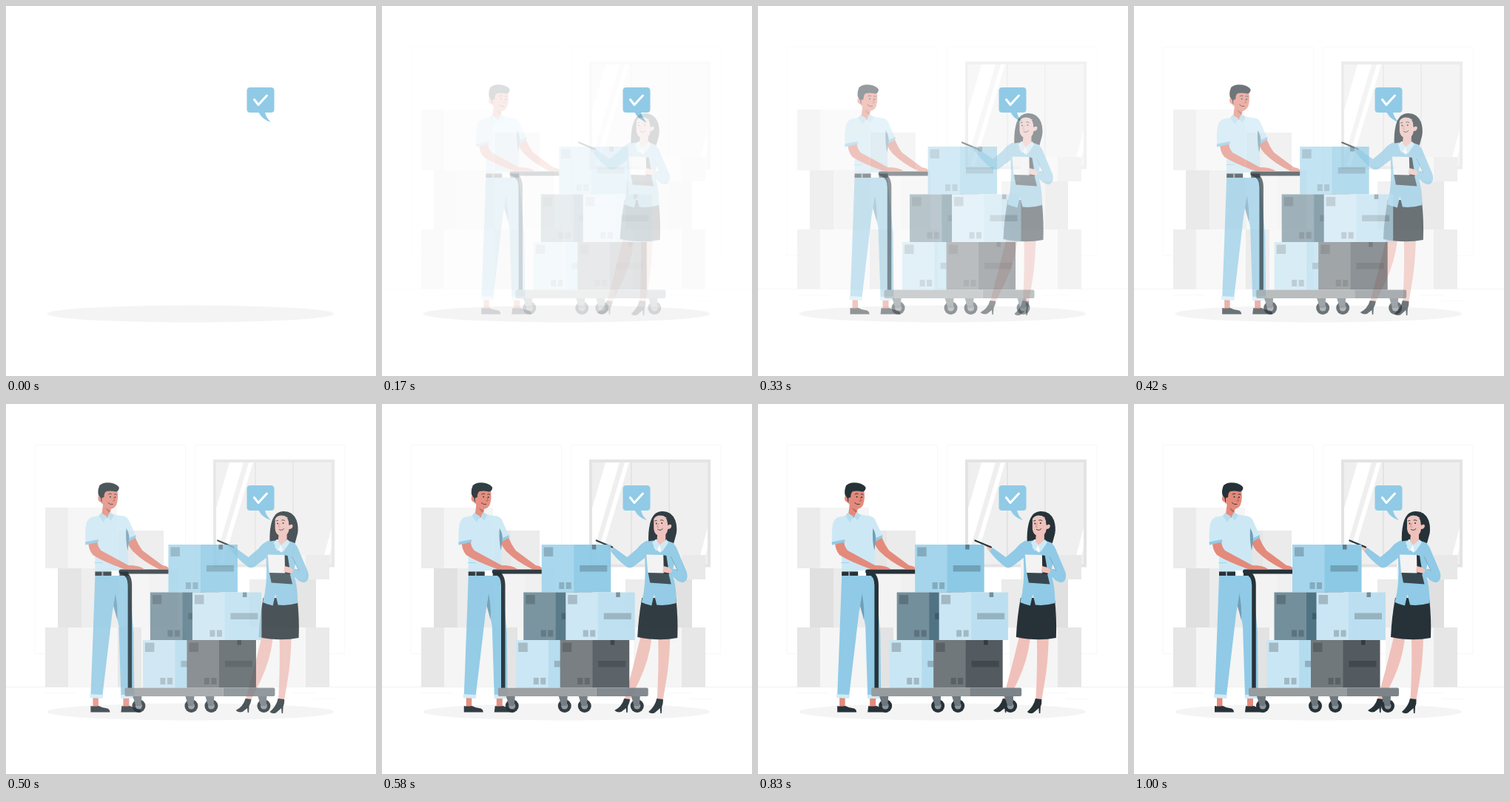
Write an HTML page that moves like this. It is 500 px wide and 500 px high and loops after 1040 ms.

```html
<!DOCTYPE html>
<html lang="en">
<head>
<meta charset="utf-8">
<title>Order check</title>
<style>
html, body { margin: 0; width: 100%; height: 100%; overflow: hidden; background: #fff; }
svg { display: block; width: 100%; height: 100%; }
.sky { fill: #90cae6; }
.pale { fill: #cde8f5; }
.ink { fill: #263238; }
.tan { fill: #e48a7b; }
.rose { fill: #efc1ba; }
.line { fill: none; stroke: #263238; stroke-linecap: round; stroke-linejoin: round; }
</style>
</head>
<body>
<svg viewBox="0 0 500 500">
  <g id="room" opacity="0">
    <g fill="none" stroke="#f7f7f7">
      <path d="M39 55.5H242.500V337.500H39ZM255.500 55.500H458V337.500H255.500Z"/>
      <path d="M0 382.500H500" stroke="#f0f0f0"/>
      <path d="M388 390.500H418M416 398.500H447M53 390.500H95"/>
    </g>
    <path fill="#e3e3e3" d="M280 75H444V220.500H280Z"/>
    <path fill="#efefef" d="M284 79H440V216.500H284Z"/>
    <path fill="#fff" d="M302 79H321L284 205V141ZM328 79H334L293 216H287ZM440 167V194L434 216H427Z"/>
    <path fill="#e3e3e3" d="M336 79H338V217H336ZM387 79H389V217H387Z"/>
    <g id="stock"></g>
  </g>
  <ellipse cx="249.500" cy="416" rx="194" ry="11.500" fill="#f4f4f4"/>
  <path class="sky" d="M330 110H358Q362.500 110 362.500 114.500V139.500Q362.500 144 358 144H350Q352 152 358 157Q347 154 341.500 144H330Q325.500 144 325.500 139.500V114.500Q325.500 110 330 110Z"/>
  <path d="M335.500 126.500L341 133.500L352.500 121" fill="none" stroke="#fff" stroke-width="3" stroke-linecap="round" stroke-linejoin="round"/>

  <g id="man" opacity="0">
    <path class="tan" d="M112 396H119.500V410H112ZM153 396H161V410H153Z"/>
    <path class="ink" d="M109 408Q114 409 120 408Q125 411 132 411.500Q135 413 135 416.500H109ZM151 408Q156 409 162 408Q167 411 174 411.500Q177 413 177 416.500H150Z"/>
    <path class="sky" d="M138 231H159Q163 260 167 310L168 394H150L147 300L139 258Z"/>
    <path fill="#6f9fb7" d="M141 250Q146 270 145 292L139 270Z"/>
    <path class="sky" d="M115 231H146Q143 255 138 284L125 394H109Q112 320 115 231Z"/>
    <path fill="#cfeaf6" d="M108 392L126 393L125 398L108 397ZM149.500 393L168.500 392V398H150Z"/>
    <path class="tan" d="M158 184L169 180Q173 190 179 198L206 218Q214 219 215 223H201Q180 213 166 199Q160 192 158 184Z"/>
    <path class="pale" d="M149 151Q157 151 160 156L170 178L158 184Z"/>
    <path class="sky" d="M157 183L170 177V180.500L159 187Z"/>
    <path class="pale" d="M112 153L126 149H139L154 152Q159 165 159 190L160 215V227H115V210Z"/>
    <path fill="#719fb6" d="M157 168Q160 172 161 179Q161 186 159 198Q156 184 157 168Z"/>
    <path class="ink" d="M115 226.500H160V232H115Z"/>
    <path fill="#fff" d="M137 225H148V232H137Z"/>
    <path fill="#90a4ae" d="M124 226H126V232H124Z"/>
    <path class="tan" d="M106 187L118 185Q118 192 123 198L160 218Q175 218 181 223H154Q126 213 112 204Q106 197 106 187Z"/>
    <path class="pale" d="M114 152Q105 153 103 162Q101 173 102 187L119 184.500Q121 166 114 152Z"/>
    <path class="sky" d="M101.500 186.500L119 183L119.500 186.500L102 190.500Z"/>
    <path class="sky" d="M114 214H125V215H114Z" opacity=".7"/>
    <path class="tan" d="M126 133L137 139L135 150L131 154L124 149Z"/>
    <path fill="#bd675c" d="M129 140L135 144L135 147Q131 145 129 140Z"/>
    <path fill="#b6dced" d="M123 147L131 152L126 160L120 151ZM135 146L141 150L136 158L132 152Z"/>
    <path class="tan" d="M124 115Q134 111 145 116Q147 127 144 136Q141 142 134 142Q127 140 124 133Q118 132 119 126Q120 122 124 124Z"/>
    <path class="ink" d="M124 136L122.500 127L119.500 123Q118 117 121 110Q126 105 136 106.500Q145 108 147.500 113Q147 118 143 118.500Q136 117 130 118Q127 120 127 126L124 127Z"/>
    <path class="line" d="M133 122Q135 120 137 121.500M141 122Q143 121 144 122.500" stroke-width=".9"/>
    <circle class="ink" cx="135.500" cy="125.500" r="1"/><circle class="ink" cx="142" cy="126" r="1"/>
    <path fill="none" stroke="#b45b50" d="M140 126L141.500 131L138.500 131"/>
    <path class="line" d="M132.500 133.500Q135 136.500 139 135.500" stroke-width=".9"/>
  </g>

  <g id="woman" opacity="0">
    <path class="ink" d="M381 145Q393 145 398 157Q401 166 399.500 175L396 188H362Q361 174 364 161Q368 145 381 145Z"/>
    <path class="rose" d="M351 315L366 317Q363 345 349 375L336.500 400H329.500Q333 384 340 359ZM375 317H391Q390 350 386 373L381.500 400H373.500Q376 352 375 317Z"/>
    <path class="ink" d="M329 398L337 399Q336 405 334 408L333.500 417H332L331.500 411L325 416Q319 417.500 316 414Q326 409 329 398ZM373 398L381.500 399Q382 405 380 409L379.500 418H378L377.500 411Q373 415 370 417.500Q364 419 362 416Q371 408 373 398Z"/>
    <path class="ink" d="M353 262H399Q402 290 401 316Q376 321 347 315Q348 290 353 262Z"/>
    <path class="sky" d="M359 186L372 184H385L396 188Q400 205 394 228Q400 248 399.500 269Q386 273 373 271.500L369.500 257L366 272.500Q357 270 352.500 268Q359 244 357 210Z"/>
    <path class="sky" d="M361 184Q353 187 346 196L333 207L315 194L311 199Q320 211 331 219Q335 223 341 220L361 205Z"/>
    <path class="rose" d="M315 194L311 199Q307 196 306.500 191Q311 189 315 194Z"/>
    <path class="line" d="M291.500 184.500L313 193.500" stroke-width="2.200"/>
    <path fill="#f7f9fa" d="M371 183L386 185L378 201L369 194Z"/>
    <path class="rose" d="M374 176H385L385 185L377 191L373 186Z"/>
    <path fill="#cfeaf6" d="M371 184L377 190L372 199L367 187ZM386 183L389 187L380 200L377 191Z"/>
    <path class="rose" d="M369 155Q372 149 382 151Q388 155 388 163Q391 161 393 164Q393 169 388 169Q387 178 379 179Q370 178 369 169Z"/>
    <path class="ink" d="M367 159Q370 151 377 150Q384 150 387 156L388 164L392 162L390 149L381 146L370 149Z"/>
    <path fill="none" stroke="#c5cdd1" stroke-width="1.200" d="M371 154Q378 149 386 154"/>
    <circle class="ink" cx="372.500" cy="161.500" r="1"/><circle class="ink" cx="380" cy="161" r="1"/>
    <path class="line" d="M370.500 158L373 157.500M378 157Q380 156 382 157.500M374.500 169.500Q378 172 381 168.500" stroke-width=".9"/>
    <path fill="none" stroke="#c98780" stroke-width=".8" d="M375.500 161L373.500 166L376 166.500"/>
    <path fill="#37474f" d="M361 226L388 225L392.500 243.500L364 241.500Z"/>
    <path class="ink" d="M381 204L386 205L390 230L381 229Z"/>
    <path fill="#f3f3f3" d="M359 203.500L382 204L382.500 228.500L361 228Z"/>
    <path class="rose" d="M382 219L390 221L395 226L392 229L381 227Z"/>
    <path class="sky" d="M391 187Q398 189 400 195L413.500 227Q416 236 411 240Q407 243 400 238L391 230L395 223L401 225L393 208Z"/>
    <path fill="none" stroke="#719fb6" stroke-width=".8" d="M392 206L401 225L396 223"/>
  </g>

  <g id="cart" opacity="0">
    <path class="line" d="M150 226.500H213" stroke-width="6"/>
    <path class="line" d="M151 227Q162 230 162 245V386" stroke-width="5.500" stroke-linecap="butt"/>
    <g id="wheels"></g>
    <g id="boxes"></g>
    <path fill="#979c9e" d="M157 383.500H288V395H157Q155 395 155 393V385.500Q155 383.500 157 383.500Z"/>
    <path fill="#7c848a" d="M288 383.500H356Q358 383.500 358 385.500V393Q358 395 356 395H288Z"/>
  </g>
</svg>
<script>
const LOOP = 1040, FPS = 24, SLIDE = 30;
const $ = id => document.getElementById(id);
const rect = (x, y, w, h, fill, alpha = 1) =>
  `<rect x="${x}" y="${y}" width="${w}" height="${h}" fill="${fill}" fill-opacity="${alpha}"/>`;

// Pale stacked boxes: a shaded side next to a lighter one.
const pair = (x, y, h, w1, c1, w2, c2) => rect(x, y, w1, h, c1) + rect(x + w1, y, w2, h, c2);
$('stock').innerHTML =
  pair(53, 140, 82, 31, '#ebebeb', 66, '#f5f5f5') +
  pair(152, 171, 51, 22, '#e6e6e6', 39, '#ebebeb') +
  pair(70, 222, 80, 32, '#e0e0e0', 62, '#ebebeb') +
  pair(152, 222, 80, 41, '#f3f3f3', 40, '#f0f0f0') +
  pair(53, 302, 80.5, 31, '#e6e6e6', 67, '#f5f5f5') +
  pair(151, 302, 80.5, 32, '#e3e3e3', 60, '#f5f5f5') +
  pair(355, 204, 33, 50, '#f3f3f3', 32, '#e8e8e8') +
  pair(329, 237, 65, 59, '#ebebeb', 31, '#e0e0e0') +
  pair(340, 302, 80.5, 65, '#f5f5f5', 32, '#e6e6e6');

function box(x, y, front, side) {
  return rect(x, y, 44, 64.5, front) + rect(x + 43.5, y, 50, 64.5, side) +
    rect(x + 3, y + 3.5, 12.5, 12.5, '#000', .2) +
    rect(x + 23.5, y + 51, 7, 9, '#000', .2) +
    rect(x + 33, y + 51, 7, 9, '#000', .2) +
    rect(x + 51.5, y + 28, 37, 8.5, '#000', .2) +
    rect(x + 68, y, 5.5, 6.5, '#000', .37);
}
$('boxes').innerHTML =
  box(214, 190, '#a4d5ec', '#8cc9e5') +
  box(189.5, 254.5, '#738f9c', '#4f7383') +
  box(246.5, 254.5, '#cae6f4', '#bbdff0') +
  box(179.5, 319, '#c9e6f4', '#b4dcef') +
  box(239, 319, '#71787c', '#535b60');

const wheel = (x, dir) =>
  `<circle cx="${x}" cy="408" r="9" fill="#263238"/><circle cx="${x}" cy="408" r="4.5" fill="#8d969c"/>` +
  `<path fill="#6e777d" d="M${x - 8 * dir} 395H${x + 4 * dir}L${x + 3 * dir} 408H${x - 4 * dir}Z"/>`;
$('wheels').innerHTML =
  [[174, 1], [245, 1], [272, 1], [343, 1]].map(w => wheel(...w)).join('');

// cubic-bezier(.36, -.01, .5, 1.38)
const curve = (u, a, b) => 3 * (1 - u) * (1 - u) * u * a + 3 * (1 - u) * u * u * b + u * u * u;
function ease(x) {
  if (x <= 0) return 0;
  if (x >= 1) return 1;
  let lo = 0, hi = 1;
  for (let i = 0; i < 30; i++) {
    const mid = (lo + hi) / 2;
    if (curve(mid, .36, .5) < x) lo = mid; else hi = mid;
  }
  return curve(lo, -.01, 1.38);
}

function draw(ms) {
  const step = Math.floor((ms % LOOP + 5) * FPS / 1000);
  const p = step < 2 ? 0 : ease((step + 1) / FPS);
  const dx = SLIDE * (1 - p);
  const alpha = Math.max(0, Math.min(1, p));
  for (const [id, dir] of [['room', 0], ['man', 1], ['cart', 1], ['woman', -1]]) {
    $(id).setAttribute('opacity', alpha);
    $(id).setAttribute('transform', `translate(${dx * dir} 0)`);
  }
}
function tick() {
  draw(performance.now());
  requestAnimationFrame(tick);
}
tick();
</script>
</body>
</html>
```
